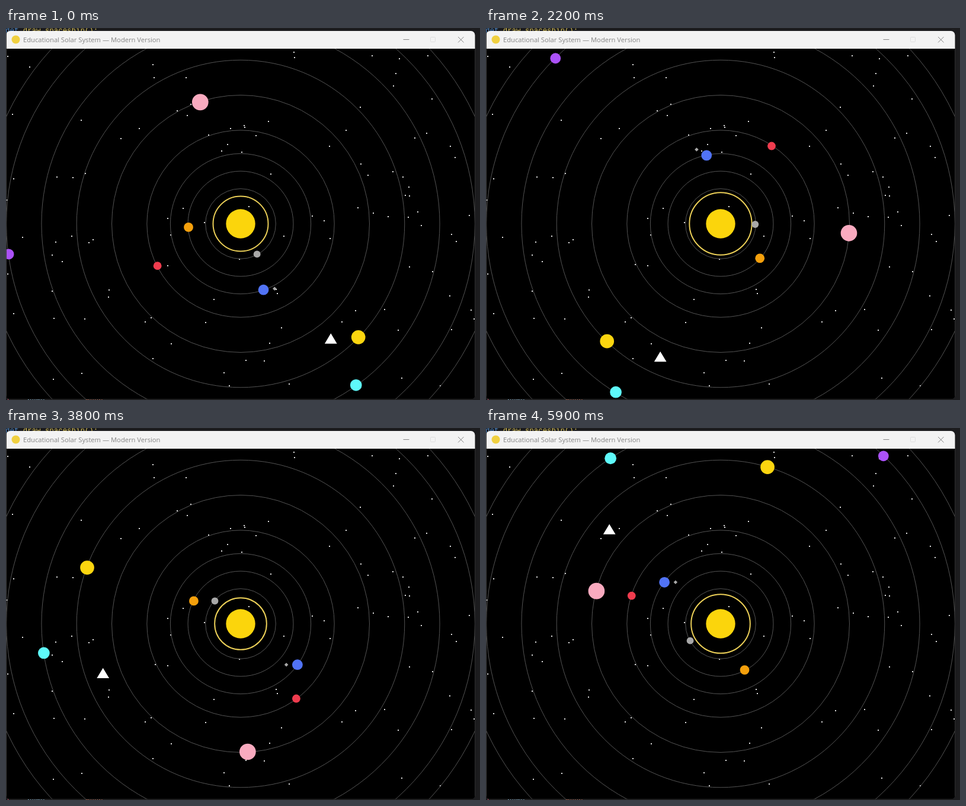
Recreate the animation shown at these times as an HTML page. Size 800x629 px, loop 6000 ms.

```html
<!DOCTYPE html>
<html lang="en">
<head>
<meta charset="utf-8">
<title>Educational Solar System</title>
<style>
  html, body { margin: 0; width: 100%; height: 100%; overflow: hidden; background: #1c1c1e; }
  svg { display: block; width: 800px; height: 629px; }
  .code { font: 12.4px "Liberation Mono", monospace; white-space: pre; }
  .title { font: 11.2px "Open Sans", sans-serif; fill: #858585; }
</style>
</head>
<body>
<svg viewBox="0 0 800 629" xmlns="http://www.w3.org/2000/svg">
  <defs>
    <clipPath id="frame"><rect y="5" width="791.5" height="623" rx="7"/></clipPath>
    <clipPath id="view"><rect x="1" y="35" width="790" height="592.5"/></clipPath>
  </defs>

  <rect width="800" height="629" fill="#1c1c1e"/>
  <text class="code" x="-1" y="8" fill="#d8c25a"><tspan fill="#4a86c8">def</tspan> draw_spaceship():</text>
  <text class="code" x="0" y="634" fill="#c0506a">{</text>
  <text class="code" x="36" y="634" fill="#8fbfe0">name</text>
  <text class="code" x="134" y="634" fill="#c0705a">Moon</text>

  <g clip-path="url(#frame)">
    <rect width="792" height="629" fill="#3c3c3c"/>
    <rect x="1" y="5" width="791" height="30" fill="#f3f3f3"/>
    <circle cx="16.5" cy="19.5" r="7" fill="#f0d040"/>
    <text class="title" x="29" y="23.6">Educational Solar System — Modern Version</text>
    <g fill="none" stroke="#858585">
      <path d="M670.5 19.5h10"/>
      <rect x="716.5" y="15.5" width="8" height="8" rx="1" stroke="#dedede"/>
      <path d="M763 15l9.500 9.500m0-9.500l-9.500 9.500"/>
    </g>
    <rect x="1" y="35" width="790" height="592.5" fill="#000"/>
  </g>

  <g clip-path="url(#view)">
    <path id="stars" fill="#dedede" shape-rendering="crispEdges"/>
    <g transform="translate(396 331) scale(0.9885)">
      <g id="orbits" fill="none" stroke="#545454"/>
      <circle r="25" fill="#fbd50c"/>
      <circle id="glow" fill="none" stroke="#ecd058" stroke-width="2"/>
      <g id="planets"></g>
      <path id="moon" d="M0-3.300L3.300 0 0 3.300-3.300 0z" fill="#a8a8a8"/>
      <path id="ship" d="M0-8.500L10.500 9h-21z" fill="#fff"/>
    </g>
  </g>
</svg>

<script>
const LOOP = 6000, STEP = 100, TICKS = 6, STARS = 114, RAD = Math.PI / 180;
const $ = id => document.getElementById(id);

function addCircle(parent, r) {
  const el = document.createElementNS('http://www.w3.org/2000/svg', 'circle');
  el.setAttribute('r', r);
  return $(parent).appendChild(el);
}

// Speed is in radians per tick, start in degrees.
function planet(orbit, size, speed, start, color) {
  addCircle('orbits', orbit);
  const el = addCircle('planets', size);
  el.setAttribute('fill', color);
  return { el, orbit, angle: n => start * RAD + speed * n };
}

const earth = planet(120, 9, 0.025, 70.7, '#5173f6');
const planets = [
  planet(60, 6, 0.04, 61.3, '#a8a8a8'),
  planet(90, 8, 0.03, 175.9, '#f5a00c'),
  earth,
  planet(160, 7, 0.02, 153.2, '#ef3c4e'),
  planet(220, 14, 0.015, 251.6, '#f9aabf'),
  planet(280, 12, 0.012, 44, '#fbd50f'),
  planet(340, 10, 0.009, 54.4, '#5ef9fa'),
  planet(400, 9, 0.007, 172.5, '#ab51f8'),
  planet(440, 5, 0.006, 13.15, '#f0f0f0')
];

// Bodies sit on whole pixels of the simulated screen.
function place(el, r, angle, [cx, cy] = [0, 0]) {
  const x = cx + Math.trunc(r * Math.cos(angle));
  const y = cy + Math.trunc(r * Math.sin(angle));
  el.setAttribute('transform', `translate(${x} ${y})`);
  return [x, y];
}

function drawStars() {
  let seed = 11, d = '';
  const rnd = (lo, hi) => {
    seed = seed * 16807 % 2147483647;
    return Math.round(lo + (hi - lo) * seed / 2147483647);
  };
  for (let i = 0; i < STARS; i++) d += `M${rnd(1, 789)} ${rnd(35, 605)}h2v2h-2z`;
  $('stars').setAttribute('d', d);
}

function draw(step) {
  const n = Math.max(0, step * TICKS - 1);
  for (const p of planets) p.pos = place(p.el, p.orbit, p.angle(n));
  place($('moon'), 20, 5 * earth.angle(n), earth.pos);
  place($('ship'), 250, 51.9 * RAD + n * 0.025 / 3);
  $('glow').setAttribute('r', 48.8 + 4.5 * Math.sin(203 * RAD + step * 0.2));
}

let begin, shown = 0;
function tick(now) {
  begin ??= now;
  const step = Math.floor((now - begin) % LOOP / STEP);
  if (step !== shown) draw(shown = step);
  requestAnimationFrame(tick);
}

drawStars();
draw(0);
requestAnimationFrame(tick);
</script>
</body>
</html>
```
